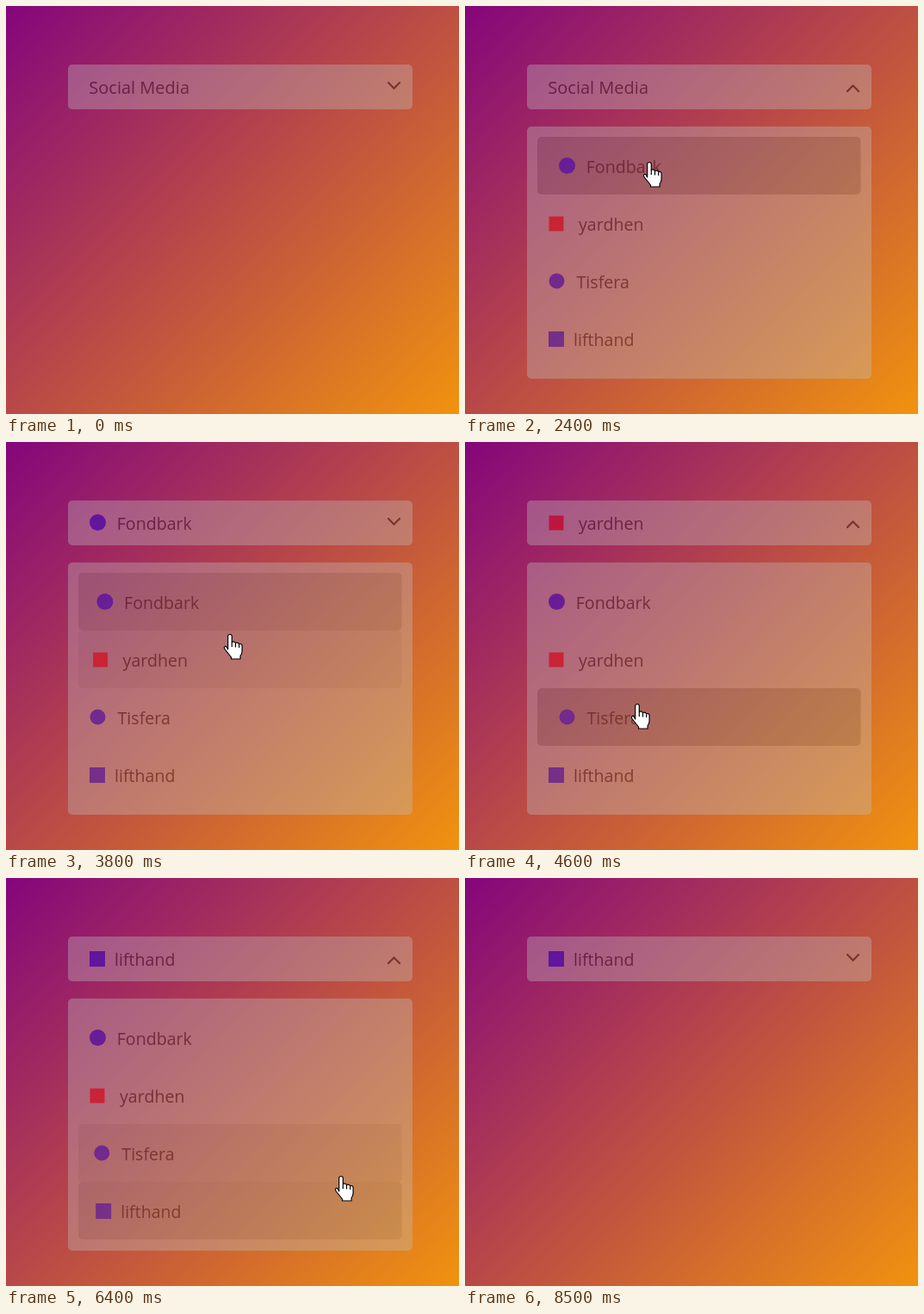
These frames come from a looping animation (526 px wide and 474 px high, 9000 ms). An HTML page:

```html
<!DOCTYPE html>
<html lang="en">
<head>
<meta charset="utf-8">
<title>Dropdown</title>
<style>
  html, body { margin: 0; width: 100%; height: 100%; overflow: hidden; }
  body { background: linear-gradient(135deg, #800080 -4%, #ffa500 113%); }
  svg { position: absolute; left: 0; top: 0; display: block; }
  text { font: 400 19.6px "Open Sans", "Noto Sans", sans-serif; fill-opacity: .9; }
  .title { font-size: 20px; }
  .glass { opacity: .36; }
  .box { fill: silver; }
  .hover { fill: #8c8c8c; }
  #chevron { fill: none; stroke: #000; stroke-width: 2.2; stroke-linecap: round; }
  #cursor { fill: #fff; stroke: #000; stroke-width: 1.2; stroke-linejoin: round; }
</style>
</head>
<body>
<svg width="526" height="474" viewBox="0 0 526 474">
  <g class="glass">
    <rect class="box" x="72" y="68" width="400" height="52" rx="5"/>
    <g id="label" transform="translate(0 102)"></g>
    <path id="chevron" d="M-6.5 -5L0 1.6L6.5 -5"/>
  </g>
  <g class="glass" id="list">
    <rect class="box" x="72" y="140" width="400" height="293" rx="5"/>
  </g>
  <g id="cursor">
    <path id="arrow" d="M0 0V17l4-4 3 6 2.5-1.2-3-5.8H12z"/>
    <g id="hand" transform="translate(-1 -1)">
      <path d="M-2.3 18V2.8a2.3 2.3 0 0 1 4.6 0V9.5q2.2-1.5 4.2 1q2.6-1.2 4.2 1.2q3-.8 3.4 2V20q0 3-2 5.5V29H1.5V27L-6 17.5q-1.3-2.5 .7-3.2q1.5-.3 3 3.7z"/>
      <path fill="none" d="M2.3 9.5V15M6.5 10.5V15.5M10.7 11.7V16"/>
    </g>
  </g>
</svg>
<script>
  const LOOP = 9000, TICK = 100, ROW = 67, TOP = 152;
  const FADE = 150, SPIN = 120;
  const $ = id => document.getElementById(id);

  // Entries are laid out around a baseline at y = 0
  const circle = r => `<circle cx="106.5" cy="-8.5" r="${r}" fill="#00f"/>`;
  const square = (size, color) =>
    `<rect x="${106 - size / 2}" y="${-8 - size / 2}" width="${size}" height="${size}" fill="${color}"/>`;
  const text = (x, s, cls = "") => `<text class="${cls}" x="${x}" y="0">${s}</text>`;
  const title = text(96.3, "Social Media", "title");
  const items = [
    circle(9.5) + text(128.7, "Fondbark"),
    square(17, "red") + text(132, "yardhen"),
    circle(9) + text(129.5, "Tisfera"),
    square(18, "#00f") + text(126, "lifthand")
  ];

  const rows = items.map((html, i) => {
    const y = TOP + i * ROW;
    $("list").insertAdjacentHTML("beforeend",
      `<g><rect class="hover" x="84" y="${y}" width="375.5" height="${ROW}" rx="5"/>
       <g>${html}</g></g>`);
    const [bg, entry] = $("list").lastElementChild.children;
    return { bg, entry, y };
  });

  // Eased pointer moves: start ms, end ms, x, y
  const home = [508, 96];
  const moves = [
    [600, 1100, 460, 82],
    [1500, 2300, 215, 182],
    [2500, 3000, 468, 150],
    [3000, 3200, 417, 145],
    [3200, 4100, 206, 252],
    [4200, 4600, 201, 305],
    [4900, 5500, 207, 385],
    [5900, 6700, 474, 330],
    [6700, 7000, 460, 110],
    [7100, 7300, 444, 108],
    [8000, 8200, 486, 195]
  ];
  const shown = [100, 8300];
  const clicks = [1410, 2410, 4110, 4810, 5810, 7510];

  const clamp = v => Math.max(0, Math.min(1, v));
  const ease = k => k * k * (3 - 2 * k);

  function pointer(t) {
    return moves.reduce(([x, y], [from, to, x1, y1]) => {
      const k = ease(clamp((t - from) / (to - from)));
      return [x + (x1 - x) * k, y + (y1 - y) * k];
    }, home);
  }

  const inside = ([x, y], l, t, r, b) => x >= l && x < r && y >= t && y < b;

  // Share of the last FADE ms that the pointer spent on a row
  function hoverAmount(y, t) {
    const n = 10;
    let hits = 0;
    for (let i = 0; i < n; i++)
      if (inside(pointer(t - i * FADE / n), 84, y, 460, y + ROW)) hits++;
    return hits / n;
  }

  let current;
  function setLabel(html) {
    if (html !== current) $("label").innerHTML = current = html;
  }

  const show = (id, on) => { $(id).style.display = on ? "" : "none"; };
  const move = (el, x, y, more = "") =>
    el.setAttribute("transform", `translate(${x} ${y}) ${more}`);

  function draw(t) {
    const done = clicks.filter(c => c <= t).length;
    const open = done > 0 && done < clicks.length;
    const turn = done ? clamp((t - clicks[done - 1]) / SPIN) : 0;
    const angle = 180 * (done % 2 ? turn : done ? 1 - turn : 0);

    // The first click only opens the list, the last one only closes it
    setLabel(done < 2 ? title : items[Math.min(done - 2, 3)]);
    move($("chevron"), 450.5, 94.1, `rotate(${angle})`);

    show("list", open);
    for (const { bg, entry, y } of rows) {
      const h = open ? hoverAmount(y, t) : 0;
      bg.style.opacity = h;
      move(entry, 12 * h, y + 42);
    }

    const p = pointer(t);
    const link = inside(p, 72, 68, 472, 120) || (open && inside(p, 72, 140, 472, 433));
    show("cursor", t >= shown[0] && t < shown[1]);
    show("hand", link);
    show("arrow", !link);
    move($("cursor"), ...p.map(Math.round));
  }

  // The picture advances ten times a second
  const start = performance.now();
  function loop() {
    const t = (performance.now() - start) % LOOP;
    draw(Math.floor(t / TICK) * TICK);
    requestAnimationFrame(loop);
  }
  loop();
</script>
</body>
</html>
```
